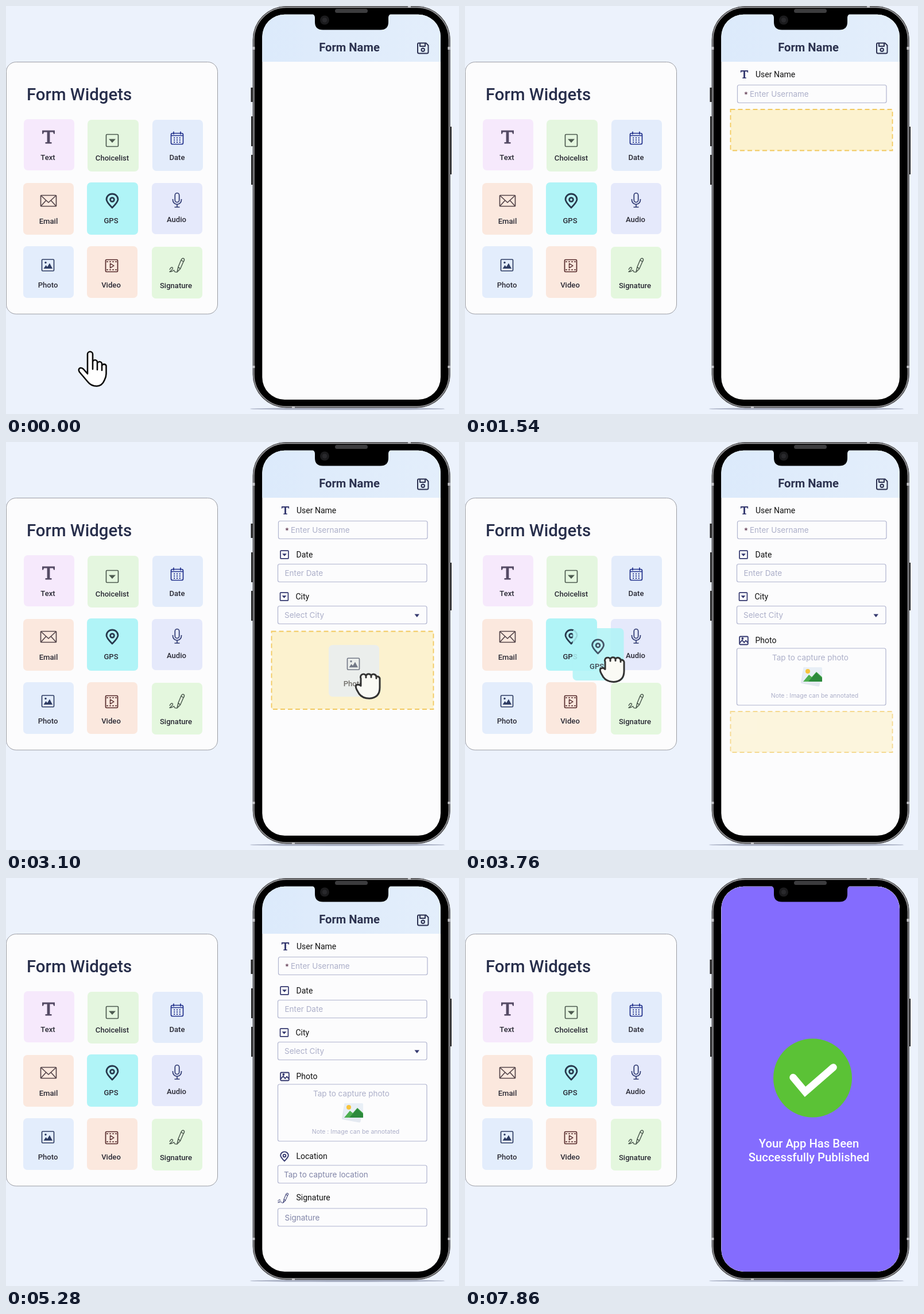
These frames come from a looping animation (789x710 px, 9 s). An HTML page:

```html
<!DOCTYPE html>
<html lang="en">
<head>
<meta charset="utf-8">
<title>Form builder</title>
<style>
html, body { margin: 0; width: 100%; height: 100%; overflow: hidden; background: #ecf2fc; }
svg { display: block; width: 789px; height: 710px; font-family: Roboto, sans-serif; }
.tile text { font-size: 13.1px; font-weight: 500; fill: #2a2a35; text-anchor: middle; }
.icon { fill: none; stroke: currentColor; stroke-linejoin: round; }
.icon .solid { fill: currentColor; stroke: none; }
.name { font-size: 14px; fill: #111; }
.box { fill: #fcfcfd; stroke: #b0b4cf; stroke-width: 1.2; }
.hint { font: 13.5px Inter, sans-serif; fill: #acafc9; }
.mid { text-anchor: middle; }
.hand { fill: #fff; stroke: #0a0a0a; stroke-width: 2.6; stroke-linejoin: round; stroke-linecap: round; }
#fist { fill: #fafaf5; stroke: #333; stroke-width: 3; }
</style>
</head>
<body>
<svg id="stage" viewBox="0 0 789 710"></svg>
<script>
const icons = {
  text: '<path class="solid" d="M-11-11.5H11V-5.5H9L8-8.500H2.400V9H5.500V11.500H-5.500V9H-2.400V-8.500H-8L-9-5.500H-11Z"/>',
  choice: '<rect x="-10.5" y="-10.5" width="21" height="21" rx="1.5"/><path class="solid" d="M-6-2.5H6L0 4Z"/>',
  date: '<rect x="-10.5" y="-8.5" width="21" height="19" rx="2.5"/><path d="M-6-11.5v5M6-11.5v5M-10-4.5H10"/>' +
    '<path stroke-width="2" stroke-dasharray="2 2.8" d="M-5.8-.5H7M-5.8 3.3H7M-5.8 7H7"/>',
  email: '<rect x="-13.5" y="-9.5" width="27" height="19" rx="1"/><path d="M-13-9L0 3L13-9M-13 9L-4-1M13 9L4-1"/>',
  gps: '<path stroke-width="2.8" d="M0 12C-5 7-10 1-10-2.5a10 9.5 0 0 1 20 0C10 1 5 7 0 12Z"/><circle cy="-2" r="3.4" stroke-width="2.8"/>',
  audio: '<rect x="-3.7" y="-12.5" width="7.4" height="16" rx="3.7"/><path d="M-7.5-2v1.5a7.5 7.5 0 0 0 15 0V-2M0 7v5M-4.5 12h9"/>',
  photo: '<rect x="-10.5" y="-10" width="21" height="20" rx="1.5"/><path class="solid" d="M-7.5 6L-3.5 0L-1 3L3-3.5L8 6Z"/><circle class="solid" cx="-4" cy="-4.5" r="1.7"/>',
  image: '<rect x="-10.5" y="-10" width="21" height="20" rx="2"/><path d="M-10 6L-4-1L1 5L5 0L10 5"/><circle cx="-3" cy="-5" r="1.5"/>',
  video: '<rect x="-10.5" y="-10.5" width="21" height="21" rx="1.5"/><path stroke-dasharray="3 2" d="M-9-7H10M-9 7H10"/><path stroke-width="1.4" d="M-2.5-3.8L4 0L-2.5 3.8Z"/>',
  sign: '<path stroke-width="1.5" d="M1 11L3 2L8-10Q10-14 12.5-12.5T12-7L6.5 5.5ZM3 2L6.5 5.5M8-10L12-7"/>' +
    '<path stroke-width="1.4" d="M-12 7C-9 0-4 3-8 7S-14 11-9 10S-5 6-4 9S-1 11 1 11"/>'
};

// id, label, tile x/y/w/h, fill, icon x/y, label x and baseline, icon colour
const tiles = [
  ['text', 'Text', 31, 197, 88, 89, '#f6e9fc', 74, 228, 73, 268, '#544a64'],
  ['choice', 'Choicelist', 142, 198, 89, 90, '#e4f6df', 185, 234, 185, 269, '#4d5b50'],
  ['date', 'Date', 255, 198, 88, 89, '#e3ecfb', 298, 230, 298, 268, '#22318c'],
  ['email', 'Email', 30, 308, 88, 90, '#fbe8de', 74, 339, 74, 379, '#54454a'],
  ['gps', 'GPS', 141, 307, 89, 91, '#b0f4f7', 185, 339, 183, 378, '#28394d'],
  ['audio', 'Audio', 254, 308, 88, 89, '#e5e9fb', 298, 338, 297, 376, '#2f3a72'],
  ['photo', 'Photo', 30, 418, 88, 90, '#e3edfc', 73, 451, 73, 490, '#2f3d63'],
  ['video', 'Video', 141, 418, 88, 90, '#fbe8de', 184, 452, 183, 490, '#54282a'],
  ['sign', 'Signature', 254, 419, 88, 90, '#e4f7de', 297, 452, 296, 491, '#4d5b50']
];

// tile, start, duration, drop zone top and bottom
const steps = [
  ['text', 40, 860, 104, 177],
  ['date', 900, 800, 180, 251.5],
  ['choice', 1740, 800, 254, 326],
  ['photo', 2600, 820, 329.5, 465],
  ['gps', 3500, 820, 469, 540],
  ['sign', 4480, 800, 541, 613]
];

const icon = (id, x, y, color, scale = 1, width = 1.7) =>
  `<g class="icon" style="color:${color};stroke-width:${width}" transform="translate(${x} ${y}) scale(${scale})">${icons[id]}</g>`;
const text = (s, x, y, attrs) => `<text x="${x}" y="${y}" ${attrs}>${s}</text>`;
const rect = (x, y, w, h, attrs) => `<rect x="${x}" y="${y}" width="${w}" height="${h}" ${attrs}/>`;

const tile = ([id, label, x, y, w, h, fill, ix, iy, lx, ly, color]) =>
  `<g class="tile" id="tile-${id}">${rect(x, y, w, h, `rx="7" fill="${fill}"`)}${icon(id, ix, iy, color)}${text(label, lx, ly, '')}</g>`;

const navy = '#34386f';
const field = (ic, ix, iy, scale, name, x, y, top, h, inner) =>
  `<g class="field">${icon(ic, ix, iy, navy, scale, 2.6)}${text(name, x, y, 'class="name"')}` +
  `${rect(x === 506 ? 474.5 : 473.5, top, 259.5, h, 'rx="3" class="box"')}${inner}</g>`;
const hint = (s, x, y, attrs = '') => text(s, x, y, 'class="hint" ' + attrs);

const picture = `<g><rect x="587" y="394" width="33" height="29" rx="2" fill="#e4e9f1" transform="rotate(10 603 408)"/>
  <rect x="589" y="392" width="33" height="26" rx="2" fill="#e8eff6"/><circle cx="597" cy="399" r="4" fill="#f8c33c"/>
  <path fill="#4cae50" d="M589 417L599 405L604 409L612 400L622 409V417Z"/><path fill="#2c8a3c" d="M598 417L612 401L622 411V417Z"/></g>`;

const form = [
  field('text', 486.5, 119, .6, 'User Name', 506, 124, 137.5, 31,
    hint('*', 486, 159, 'style="fill:#59304a"') + hint('Enter Username', 496, 158)),
  field('choice', 485, 196, .66, 'Date', 505.5, 201, 212.5, 31, hint('Enter Date', 485.5, 233)),
  field('choice', 484.5, 269, .66, 'City', 504.5, 274, 285.5, 31,
    hint('Select City', 485, 306) + `<path d="M711.5 299.5h8.5l-4.2 5.5Z" fill="${navy}"/>`),
  field('image', 485.5, 345.5, .7, 'Photo', 505.5, 350, 359, 99,
    hint('Tap to capture photo', 601.5, 380, 'text-anchor="middle"') + picture +
    hint('Note : Image can be annotated', 609, 445, 'text-anchor="middle" style="font-size:10.5px"')),
  field('gps', 485, 484.5, .68, 'Location', 505.5, 489, 500, 31,
    hint('Tap to capture location', 484, 521, 'style="fill:#8185a8"')),
  field('sign', 482, 557.5, .7, 'Signature', 505.5, 561, 575, 31, hint('Signature', 485.5, 596, 'style="fill:#8185a8"'))
].join('');

const bar = (x, y, w, h, fill) => rect(x, y, w, h, `fill="${fill}"`);
const phone = `
  <ellipse cx="595" cy="701" rx="170" ry="2" fill="#a9b0c4"/>
  ${bar(426.5, 142, 4, 25, '#222')}${bar(427, 192, 4, 52, '#222')}${bar(427, 259, 4, 52, '#222')}${bar(772, 210, 4, 83, '#222')}
  ${rect(430, .5, 343.5, 698.5, 'rx="58" fill="#3a3a3c" stroke="#6f6f72" stroke-width="1"')}
  ${rect(432, 2.5, 339.5, 694.5, 'rx="56" fill="#000" stroke="#a4a4a7" stroke-width="1.4"')}
  ${bar(429.5, 71, 4, 5, '#c4c4c8')}${bar(769.5, 71, 4, 5, '#c4c4c8')}${bar(429.5, 626, 4, 4, '#c4c4c8')}${bar(769.5, 626, 4, 4, '#c4c4c8')}
  ${bar(700, 0, 5, 3, '#c4c4c8')}${bar(498, 697, 5, 3, '#c4c4c8')}`;

const notch = `<path d="M532 13Q538 15 538 20V28Q538 41.500 552 41.500H652Q666 41.500 666 28V20Q666 15 672 13Z"/>
  <circle cx="555" cy="24.5" r="8" fill="#1b1b1d"/><circle cx="555" cy="24.5" r="4" fill="#29292c"/>
  ${rect(573, 5, 57, 7, 'rx="3.5" fill="#3c3c3e"')}`;

const save = `<g fill="none" stroke="#2c3150" stroke-width="2" stroke-linejoin="round">
  <path d="M719 64.5H731.5L735.5 68.5V80Q735.5 82.5 733 82.5H719.5Q717 82.5 717 80V66.5Q717 64.5 719 64.5Z"/>
  <path d="M721 65v5h9v-5"/><circle cx="726.2" cy="76.3" r="2.7"/></g>`;

const glass = attrs => rect(446.3, 14.7, 310.7, 670.3, 'rx="39" ' + attrs);
const screen = (id, fill, inner) => `<g id="${id}">${glass(`fill="${fill}"`)}${inner}</g>`;

document.getElementById('stage').innerHTML = `
  <defs><clipPath id="glass">${glass('')}</clipPath>
  <linearGradient id="sky"><stop stop-color="#dceafb"/><stop offset="1" stop-color="#e3eefb"/></linearGradient></defs>
  ${rect(.5, 97.5, 368, 438.5, 'rx="17" fill="#fcfcfd" stroke="#9a9ca3"')}
  ${text('Form Widgets', 36, 164, 'font-size="29.4" font-weight="500" fill="#272e4b"')}
  ${tiles.map(tile).join('')}
  ${phone}
  <g clip-path="url(#glass)">
    ${bar(446, 14, 311, 672, '#fcfcfd')}${bar(446, 14, 311, 83, 'url(#sky)')}
    ${text('Form Name', 598, 78.5, 'class="mid" font-size="20.2" font-weight="600" fill="#2b314e"')}${save}
    ${form}
    <g id="submit">${rect(473.5, 624, 259.5, 44, 'rx="3" fill="#8067fb"')}
      ${text('Submit', 604.5, 653, 'class="mid" font-size="17.5" font-weight="600" fill="#fff"')}</g>
    <rect id="zone" x="462.5" width="282" fill="#fcf2cf" stroke="#f2c95f" stroke-width="1.8" stroke-dasharray="8 5"/>
    ${screen('loading', '#fcfcfd', `<g fill="none" stroke-width="17"><circle cx="608" cy="348" r="86" stroke="#efeef5"/>
      <circle id="arc" cx="608" cy="348" r="86" stroke="#7f66fb" pathLength="100" transform="rotate(-90 608 348)"/></g>
      <text id="count" x="571" y="362" font-size="31" font-weight="700" fill="#7358ee"></text>`)}
    ${screen('done', '#846cfe', `<g id="tick"><circle cx="605.5" cy="348" r="68.5" fill="#5bc236"/>
      <path d="M571.5 347L592.5 372L641.5 329.5" fill="none" stroke="#fff" stroke-width="12.5" stroke-linecap="round"/></g>
      <g class="mid" font-size="20.3" font-weight="500" fill="#fff">${text('Your App Has Been', 599, 468.5, '')}${text('Successfully Published', 599, 493, '')}</g>`)}
  </g>
  ${notch}
  <use id="drag"/>
  <g id="hand">
    <path class="hand" id="point" d="M-9 4V-26a4.5 4.5 0 0 1 9 0V-12a4 4 0 0 1 8 0v3a4 4 0 0 1 8 0v3a4 4 0 0 1 7.5 0V8q0 5-3 11-4 10-13.5 10.5-10 0-16-8L-23 5q-3-5 1-7 3-1 6 2L-9 8V4M0-12V0M8-9V1M16-6V2"/>
    <path class="hand" id="fist" d="M-12 0V-13a5 5 0 0 1 9-4.5a5 5 0 0 1 9-.5a5 5 0 0 1 9 2a4.500 4.500 0 0 1 6 5V3q0 18-18 19Q-9 22-15 14L-19 7q-4-8 1-9 4-.5 6 2ZM-3-17.500v3M6-18v3M15-16v3"/>
  </g>`;

const $ = id => document.getElementById(id);
const fields = document.querySelectorAll('.field');
const span = (t, a, b) => Math.min(1, Math.max(0, (t - a) / (b - a)));
const ease = p => p * p * (3 - 2 * p);
const mix = (a, b, p) => a + (b - a) * p;
const fade = (el, v) => { el.style.opacity = v; el.style.display = v > 0 ? '' : 'none'; };
const zoom = (el, s, x, y) => el.setAttribute('transform', `translate(${x} ${y}) scale(${s}) translate(${-x} ${-y})`);

function hand(x, y, alpha, closed, scale = 1) {
  fade($('hand'), alpha);
  $('hand').setAttribute('transform', `translate(${x} ${y}) scale(${scale})`);
  fade($('point'), closed ? 0 : 1);
  fade($('fist'), closed ? 1 : 0);
}

function dragStep(t, [id, start, length, top, bottom], first) {
  const p = (t - start) / length;
  const [, , x, y, w, h] = tiles.find(s => s[0] === id);
  const cx = x + w / 2, cy = y + h / 2, zoneY = (top + bottom) / 2;
  const reach = ease(span(p, 0, .2)), move = ease(span(p, .25, .58));
  const dx = (606 - cx) * move, dy = (zoneY + 1 - cy) * move;
  const fromX = first ? 151 : cx + 24, fromY = first ? 632 : cy + 70;

  hand(mix(fromX, cx + 24, reach) + dx, mix(fromY, cy + 26, reach) + dy,
    (first ? 1 : span(p, 0, .1)) * (1 - span(p, .67, .77)), p > .21);

  $('drag').setAttribute('href', '#tile-' + id);
  $('drag').setAttribute('transform', `translate(${dx} ${dy})`);
  fade($('drag'), p > .21 ? .85 * (1 - span(p, .58, .72)) : 0);

  $('zone').setAttribute('y', top);
  $('zone').setAttribute('height', bottom - top);
  fade($('zone'), span(p, .25, .35) * (1 - span(p, .82, .92)));
}

function draw(t) {
  for (const id of ['hand', 'drag', 'zone']) fade($(id), 0);
  steps.forEach((s, i) => {
    const [, start, length] = s;
    fade(fields[i], span(t, start + length * .84, start + length));
    if (t < start + length && (t >= start || i === 0)) dragStep(Math.max(t, start), s, i === 0);
  });

  fade($('submit'), span(t, 5500, 5660));
  if (t > 5500 && t < 6320) {
    const go = ease(span(t, 5520, 5980));
    const press = Math.sin(Math.PI * span(t, 6000, 6160));
    hand(mix(340, 612, go), mix(580, 668, go), span(t, 5500, 5580) * (1 - span(t, 6200, 6320)), false, 1 - .1 * press);
  }

  const load = span(t, 6420, 6540), done = span(t, 7480, 7600);
  fade($('loading'), load);
  zoom($('loading'), mix(.8, 1, load), 602, 350);
  const percent = Math.round(100 * span(t, 6540, 7220));
  $('count').textContent = percent + '%';
  $('arc').setAttribute('stroke-dasharray', `${percent} 101`);
  fade($('arc'), percent ? 1 : 0);

  fade($('done'), done);
  zoom($('done'), mix(.8, 1, done), 602, 350);
  zoom($('tick'), mix(.6, 1, ease(span(t, 7500, 7850))), 605.5, 348);
}

const begin = performance.now();
function tick() {
  draw((performance.now() - begin) % 9000);
  requestAnimationFrame(tick);
}
tick();
</script>
</body>
</html>
```
